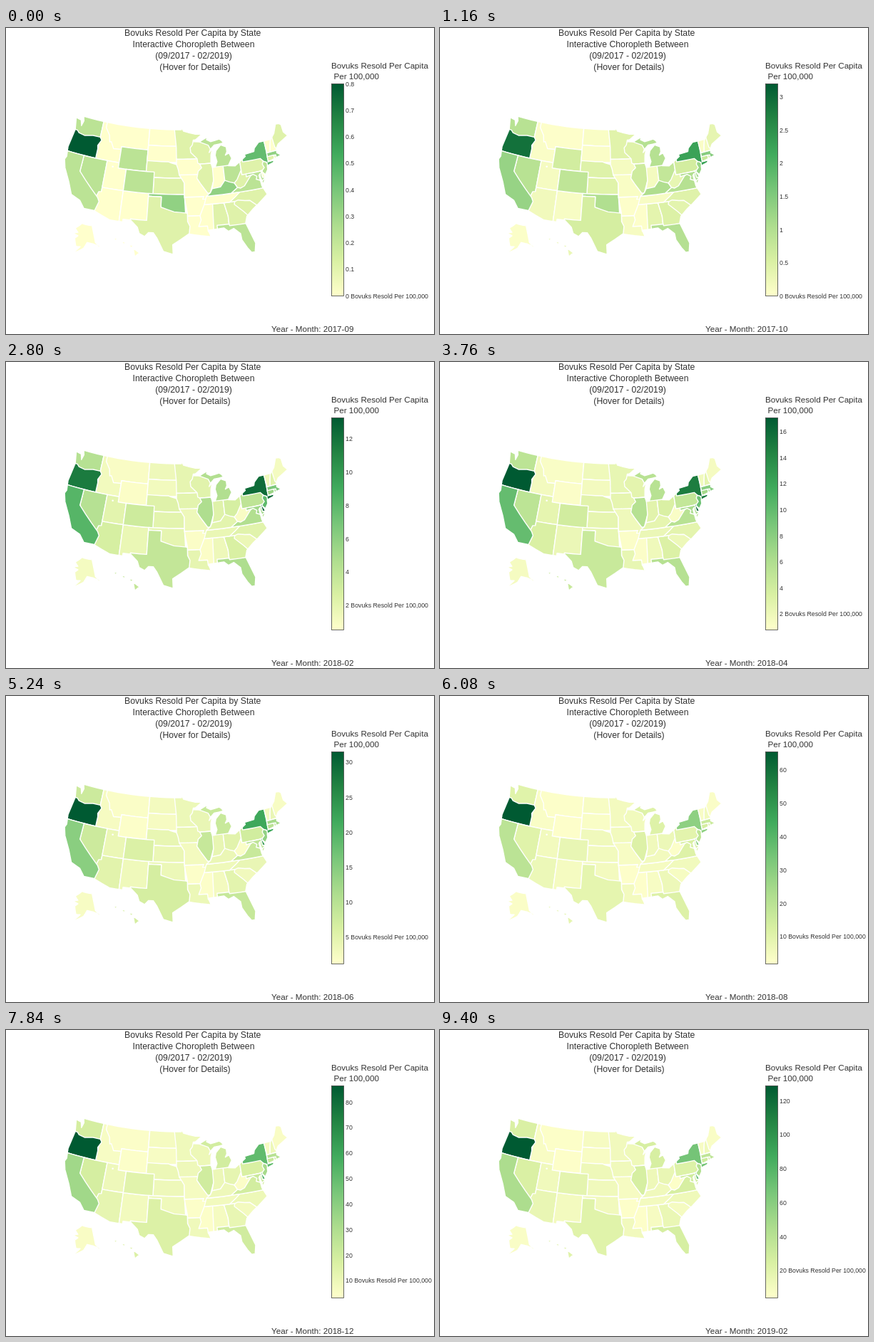
An HTML page that plays this animation: 600 by 430 pixels, repeating every 9440 ms.

```html
<!DOCTYPE html>
<html lang="en">
<head>
<meta charset="utf-8">
<title>Resold per capita by state</title>
<style>
  html, body { margin: 0; width: 100%; height: 100%; overflow: hidden; background: #fff; }
  svg { display: block; }
  text { font-family: "Liberation Sans", Arial, sans-serif; font-size: 11.65px; fill: #333; white-space: pre; }
  .title text { font-size: 12.25px; text-anchor: middle; }
  #ticks text { font-size: 8.77px; }
  .map path { stroke: #fff; stroke-width: 1.4; stroke-linejoin: round; }
</style>
</head>
<body>
<svg width="600" height="430" viewBox="0 0 600 430">
  <defs>
    <linearGradient id="scale" x1="0" y1="1" x2="0" y2="0"></linearGradient>
    <clipPath id="coast"></clipPath>
  </defs>
  <g class="title">
    <text x="261.7" y="11">Bovuks Resold Per Capita by State</text>
    <text x="263" y="27">Interactive Choropleth Between</text>
    <text x="263" y="43.3">(09/2017 - 02/2019)</text>
    <text x="265" y="59.3">(Hover for Details)</text>
  </g>
  <g class="map">
    <g id="land" clip-path="url(#coast)"></g>
    <g id="detached"></g>
  </g>
  <text x="456" y="56.5">Bovuks Resold Per Capita</text>
  <text x="459.5" y="72">Per 100,000</text>
  <rect x="456.5" y="78.5" width="17" height="298" fill="url(#scale)" stroke="#444" stroke-width=".8"/>
  <g id="ticks"></g>
  <text id="date" x="372" y="426.5"></text>
</svg>
<script>
const LOOP = 9440, FIRST = 250, STEP = 500, MONTHS = 18;
const BAR = { top: 78.5, bottom: 376.5 };
const PALETTE = ['#ffffcc', '#d9f0a3', '#addd8e', '#78c679', '#41ab5d', '#238443', '#005a32'];
const SETTLED = 3;      // month from which the states keep their order
const EARLY_UNIT = .14; // shade per sales level in the first month

// Values between these months are interpolated
const KEYS = [
  { month: 0, high: .8, low: 0, oregon: 1, others: 1 },
  { month: 2, high: 5.6, low: 0, oregon: .82, others: 1 },
  { month: 3, high: 9.4, low: .3, oregon: .74, others: 1 },
  { month: 7, high: 17.07, low: .78, oregon: 1, others: .86 },
  { month: 9, high: 31.5, low: 1.2, oregon: 1, others: .68 },
  { month: 11, high: 65.5, low: 1.8, oregon: 1, others: .43 },
  { month: 15, high: 86.4, low: 3.2, oregon: 1, others: .57 },
  { month: 17, high: 128.8, low: 3.9, oregon: 1, others: .51 }
];

const $ = id => document.getElementById(id);
const mix = (a, b, t) => a + (b - a) * t;

function valueAt(month, field) {
  const i = Math.max(1, KEYS.findIndex(key => key.month >= month));
  const a = KEYS[i - 1], b = KEYS[i];
  return mix(a[field], b[field], (month - a.month) / (b.month - a.month));
}

function add(parent, tag, attrs, text = '') {
  const el = document.createElementNS('http://www.w3.org/2000/svg', tag);
  for (const name in attrs) el.setAttribute(name, attrs[name]);
  el.textContent = text;
  parent.append(el);
  return el;
}

const rad = degrees => degrees * Math.PI / 180;
// Albers equal-area conic; longitudes are degrees west
function albers(lat1, lat2, meridian, center, scale, x, y) {
  const n = (Math.sin(rad(lat1)) + Math.sin(rad(lat2))) / 2;
  const c = Math.cos(rad(lat1)) ** 2 + 2 * n * Math.sin(rad(lat1));
  const raw = ([lon, lat]) => {
    const rho = Math.sqrt(c - 2 * n * Math.sin(rad(lat))) / n, theta = n * rad(meridian - lon);
    return [rho * Math.sin(theta), rho * Math.cos(theta)];
  };
  const origin = raw(center);
  return point => {
    const p = raw(point);
    return [x + scale * (p[0] - origin[0]), y + scale * (p[1] - origin[1])];
  };
}
const mainland = albers(29.5, 45.5, 96, [96.6, 38.7], 433, 238.3, 221);
const alaska = albers(55, 65, 154, [156, 58.5], 150, 106, 308);
const hawaii = albers(8, 18, 157, [160, 19.9], 430, 150, 313);

// Rings of "lon lat" corners, subdivided so that parallels curve
function outlinePath(outline, project) {
  return outline.split('|').map(ring => {
    const v = ring.split(' ').map(Number), corners = [], points = [];
    for (let i = 0; i < v.length; i += 2) corners.push([v[i], v[i + 1]]);
    corners.forEach(([lon, lat], i) => {
      const [lon2, lat2] = corners[(i + 1) % corners.length];
      const parts = Math.ceil(Math.abs(lon2 - lon) / 2) || 1;
      for (let s = 0; s < parts; s++)
        points.push(project([mix(lon, lon2, s / parts), mix(lat, lat2, s / parts)]).map(a => a.toFixed(2)));
    });
    return 'M' + points.join('L') + 'Z';
  }).join('');
}

const box = (west, east, south, north) =>
  [west, north, east, north, east, south, west, south].join(' ');

const states = [];
// level: sales level in the first month; share: shade once settled
function state(level, share, outline, project = mainland) {
  const parent = project === mainland ? $('land') : $('detached');
  const path = add(parent, 'path', { d: outlinePath(outline, project) });
  const shade = month => mix(level * EARLY_UNIT, share, Math.min(1, month / SETTLED)) * valueAt(month, 'others');
  const entry = { path, shade };
  states.push(entry);
  return entry;
}

// The coast trims every state, and later states cover earlier ones,
// so each outline only needs the borders that stay visible.
const north = '124.7 48.4 123.2 48.2 122.7 47.2 122.4 48.2 122.8 49 95.2 49 95.1 49.4 94.6 48.7 91.5 48.1 89.6 48 92 46.7 90.4 46.6 88.2 47.4 88.4 46.9 87.4 46.5 85 46.8 84.4 46.5 84 46 86.5 45.8 87.6 45.1 88 44.5 87.1 45.2 87.6 44 87.8 42.5 87.5 41.7';
const lakes = '86.8 41.7 86.2 42.7 86.5 43.9 86.2 44.7 84.8 45.7 83.4 45.2 83.4 44.3 83.9 43.7 82.9 44 82.4 43 83.5 41.7 81.8 41.5 78.9 42.9 79 43.3 76.5 43.5 76.2 44.1 74.8 45 71.5 45 70.3 45.9 69.2 47.5 68.3 47.4 67.8 47.1 67.8 45.7 67 44.8';
const atlantic = '68.5 44.3 70 43.8 70.7 43.1 70.9 42.3 70 41.7 71.2 41.5 73.6 41.1 72 41.1 72.4 40.7 74 40.4 74.1 39.7 74.9 38.9 75.5 39.5 75 38.5 75.9 37.2 76.2 38.7 76.1 39.3 76.5 39 76.3 37 75.5 35.3 77.9 33.9 79.2 33.2 80.9 32 81.4 30.8 80 26.8 80.4 25.2';
const gulf = '81.1 25.2 81.8 26.2 82.7 27.8 82.8 29 84.1 30.1 85.3 29.7 86.2 30.4 89.6 30.2 89.1 29 91.3 29.3 93.8 29.7 97.2 27.7 97.1 25.9 99.1 26.4 100.6 28.9 101.4 29.8 102.4 29.8 103.2 29 104.4 29.5 104.9 30.6 106.5 31.8';
const pacific = '108.2 31.8 108.2 31.3 111 31.3 114.8 32.5 117.1 32.5 118.4 33.8 120.6 34.5 121.9 36.6 123.7 38.9 124.4 40.4 124.1 41 124.5 42.8 124 46.2';
const coast = outlinePath([north, lakes, atlantic, gulf, pacific].join(' '), mainland);
add($('coast'), 'path', { d: coast });

// West
state(2, .32, box(125, 117, 45, 49.5)); // WA
state(0, .06, box(117, 111, 42, 49.5)); // ID
state(0, .03, '116 49.5 104 49.5 104 45 111 45 111 44.5 113 44.4 113.9 45.6 114.3 45.5 114.7 46.7 116 48'); // MT
state(1, 1, '125 46.25 123.4 46.2 122.8 45.8 121.2 45.6 119 46 117 46 116.5 45.5 117.2 44.4 117 43.8 117 42 125 42') // OR
  .shade = month => valueAt(month, 'oregon');
state(2, .32, box(120, 114, 35, 42)); // NV
state(0, .13, box(114, 109, 37, 42)); // UT
state(2, .02, box(111, 104, 41, 45)); // WY
state(0, .19, '114 37 109 37 109 31 115 31 115 35 114.6 36.1 114 36.2'); // AZ
state(2, .65, '125 42 120 42 120 39 114.6 35 114.1 34.3 114.7 32.5 118 32 125 38'); // CA
state(0, .1, box(109, 103, 31, 37)); // NM

// Plains
state(0, .08, box(104, 96, 45.9, 49.5)); // ND
state(0, .06, box(104, 96, 42.9, 45.9)); // SD
state(1, .15, '104 43 98.5 43 97.9 42.8 96.4 42.5 95 40 104 40'); // NE
state(1, .13, box(102, 94.6, 37, 40)); // KS
state(2, .23, box(109, 102, 37, 41)); // CO
state(3, .12, '103 37 94.6 37 94.4 33 100 33 100 36.5 103 36.5'); // OK
state(1, .12, '97.2 49.5 96.6 45.9 96.5 43.5 89 43.5 89 49.5'); // MN
state(0, .13, '96.5 43.5 90 43.5 90 40.5 95.8 40.6 96.1 41.7 96.5 42.5'); // IA
state(0, .02, '94.6 36.5 89.5 36.5 89.5 33 94 33 94 33.6 94.4 35.4'); // AR
state(0, .08, '95.8 40.6 91 40.6 88.5 37 89.7 36 90.4 36 90.1 36.5 94.6 36.5 94.6 39.1 95.3 40'); // MO
state(0, .12, box(94, 88.8, 28.5, 33)); // LA
state(1, .27, '106.6 32 103 32 103 36.5 100 36.5 100 34.6 97 33.8 94.5 33.6 94 33.5 94 32 93.5 31.1 93.8 29 97 25 106.6 28'); // TX

// Great Lakes
state(1, .14, '92 47 92.3 46.1 92.9 45.6 92.8 44.7 91.2 43.5 91.1 42.7 90.6 42.5 87 42.5 86.5 45.3 88 47'); // WI
state(1, .35, '90.6 42.5 87 42.5 87.5 39.3 88.5 37.1 89.1 37 90.2 38.3 90.7 38.9 91.5 39.9 91.1 41.2 90.2 41.8'); // IL
state(0, .15, '87.5 42 84.8 42 84.8 38.7 86 37.9 88 37.8 87.5 39.3'); // IN
state(2, .19, '84.8 41.8 80.5 42.3 80.5 40 82 38 84.8 38.7'); // OH
state(2, .34, '90.4 46.6 88.1 45.9 87.6 45.1 87 45 87 41.75 82 41.75 82 48 89 48'); // MI

// Southeast
state(0, .02, '90.1 35 88 35 88.3 30 89.6 30 89.7 31 91.6 31 91 32.2 91.2 33'); // MS
state(1, .08, '88.2 35 85.6 35 85 32.5 85 30 88.4 30'); // AL
state(1, .14, '84.3 35 81.7 36.6 75 36.6 75 34 78.3 33 83 35'); // NC
state(1, .18, '85.6 35 83.1 35 80 32 81 30 85 30 85 32.5'); // GA
state(1, .09, '83.1 35 82.3 35.2 80.8 34.9 79.7 34.8 78.3 33.7 80.5 32 81.5 33 83.3 34.5'); // SC
state(2, .35, '87.6 31 85 31 84.9 30.7 81 30.7 79 25 83 25 87.6 30'); // FL
state(2, .34, '83.7 36.6 82 37.5 78 39.6 76 39 75 38 75 36.6'); // VA
state(0, .1, '89.5 36.5 81.7 36.6 82.6 36 84.3 35 90.1 35'); // TN
state(3, .13, '84.8 39.1 83.7 38.7 82.6 38.4 82 37.5 83.7 36.6 89.5 36.5 88.5 37.1 88 37.8 86 38'); // KY
state(1, .03, '82.6 38.4 81.8 39 80.5 40.6 80.5 39.7 79.5 39.7 79.5 39.2 77.8 39.5 78.5 39.2 80.3 37.6 81.3 37.3 82 37.5'); // WV

// Northeast
state(1, .29, box(80.5, 74.7, 39.7, 42.4)); // PA
state(2, .4, '79.5 39.7 75.8 39.7 75.7 38.5 75 38.4 76 37.9 77.3 38.4 77 38.9 77.8 39.4 79.5 39.2'); // MD
state(0, 1.1, '75.8 39.8 75.3 39.8 74.9 38.5 75.7 38.5'); // DE
state(4, 1, '79.8 43 79.8 42 75.3 42 74.7 41.4 73.9 41 74.3 40.3 71.5 40.5 71.5 41.15 73.5 41.1 73.3 45.2 79 45.2'); // NY
state(2, .62, '74.7 41.4 73.9 41 73.9 38.5 74.9 38.7 75.5 39.5 75.4 39.8 74.8 40.2 75.1 40.9'); // NJ
state(3, .52, box(73.4, 69.5, 41.3, 42.75)); // MA
state(1, .42, box(73.5, 71.8, 41.15, 42.03)); // CT
state(1, .4, box(71.8, 71.3, 41.2, 42)); // RI
state(0, .14, '71.5 45.5 70.6 45.5 70.6 42.8 72.5 42.75 72.1 44'); // NH
state(0, .07, '73.4 45.2 71.5 45.2 72.1 44 72.5 42.75 73.3 42.75'); // VT
state(1, .05, '71.1 45.5 71 43.4 70.6 42.9 66 44 66 48 71 48'); // ME

// Alaska and Hawaii
state(0, .05, '141 69.6 156.5 71.3 166 68.4 161.5 66.3 168 65.6 161 64.5 164.5 63 162 58.7 157.5 58.8 164.8 54.6 154 58 150 61 144 60 140 58.7 138 57 137.5 58 141 60.3', alaska);
state(0, .27, '156 20.4 154.8 19.5 155.7 18.8|156.8 21.1 155.9 20.8 156.5 20.5|158.4 21.7 157.6 21.5 157.8 21.1|159.9 22.3 159.2 22.2 159.5 21.8', hawaii);

add($('detached'), 'path', { d: coast, fill: 'none' });
const [lakeX, lakeY] = mainland([112.4, 41.1]);
add($('detached'), 'circle', { cx: lakeX, cy: lakeY, r: 1.3, fill: '#fff' });

PALETTE.forEach((color, i) =>
  add($('scale'), 'stop', { offset: i / (PALETTE.length - 1), 'stop-color': color }));

function colorAt(shade) {
  const pos = Math.min(Math.max(shade, 0), 1) * (PALETTE.length - 1);
  const i = Math.min(Math.floor(pos), PALETTE.length - 2);
  const channel = (color, c) => parseInt(color.slice(1 + 2 * c, 3 + 2 * c), 16);
  const rgb = [0, 1, 2].map(c =>
    Math.round(mix(channel(PALETTE[i], c), channel(PALETTE[i + 1], c), pos - i)));
  return `rgb(${rgb})`;
}

function tickStep(range) {
  const rough = range / 10, power = 10 ** Math.floor(Math.log10(rough));
  return power * [1, 2, 5, 10].find(f => f * power >= rough - 1e-9);
}

function showMonth(m) {
  const low = valueAt(m, 'low'), high = valueAt(m, 'high'), step = tickStep(high - low);
  const first = Math.ceil(low / step);
  $('ticks').replaceChildren();
  for (let i = first; i * step <= high + 1e-9; i++) {
    const y = mix(BAR.bottom, BAR.top, (i * step - low) / (high - low));
    const label = +(i * step).toFixed(1) + (i === first ? ' Bovuks Resold Per 100,000' : '');
    add($('ticks'), 'text', { x: 476, y: y + 3.2 }, label);
  }
  for (const { path, shade } of states) path.setAttribute('fill', colorAt(shade(m)));
  const year = 2017 + Math.floor((m + 8) / 12), month = (m + 8) % 12 + 1;
  $('date').textContent = `Year - Month: ${year}-${String(month).padStart(2, '0')}`;
}

let shown = -1;
function tick() {
  const t = performance.now() % LOOP;
  const m = Math.min(Math.max(Math.floor((t - FIRST) / STEP), 0), MONTHS - 1);
  if (m !== shown) showMonth(shown = m);
  requestAnimationFrame(tick);
}
// The oregon entry replaces its shade rule, so read it from the entry each time
tick();
</script>
</body>
</html>
```
